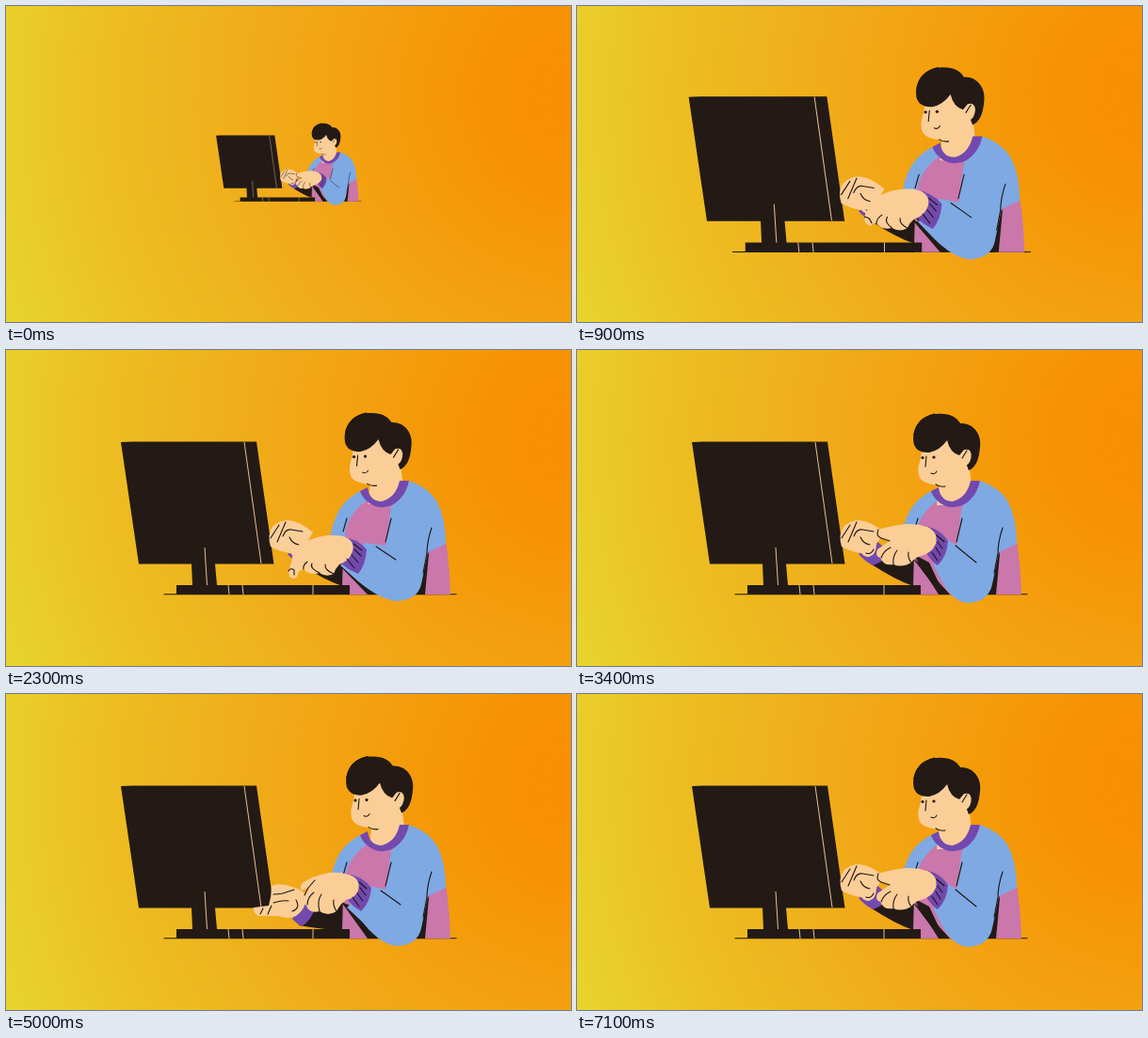
An HTML page that plays this animation: 600x336 px, repeating every 7200 ms.

```html
<!DOCTYPE html>
<html lang="en">
<head>
<meta charset="utf-8">
<title>Typing at a desk</title>
<style>
  html, body { margin: 0; height: 100%; overflow: hidden; background: #f2a617; }
  svg { display: block; width: 100%; height: 100%; }
  .ink { fill: #231a16; }
  .blue { fill: #7ea9e3; }
  .pink { fill: #ca77ab; }
  .purple { fill: #7349ae; }
  .skin { fill: #fbce98; }
  .line, .glint { fill: none; stroke: #1d1512; stroke-width: 1.1; stroke-linecap: round; stroke-linejoin: round; }
  .glint { stroke: #e9bf8d; stroke-width: 1; stroke-linecap: butt; }
</style>
</head>
<body>
<svg viewBox="0 0 600 336">
  <defs>
    <radialGradient id="sky" gradientUnits="userSpaceOnUse" cx="612" cy="95" r="650">
      <stop offset="0" stop-color="#f88e00"/>
      <stop offset=".17" stop-color="#f79303"/>
      <stop offset=".5" stop-color="#f1a917"/>
      <stop offset=".8" stop-color="#ecbf23"/>
      <stop offset="1" stop-color="#e8d32e"/>
    </radialGradient>
  </defs>
  <rect width="600" height="336" fill="url(#sky)"/>
  <g id="scene">
    <path class="line" d="M168 259.700H478"/>

    <g id="torso">
      <path class="blue" d="M345 195Q349 174 360 162Q368 154 378 149L391 164L365 191L357 222L348 222Z"/>
      <path class="pink" d="M361 190Q367 171 382 161L411 164L412 215L420 260H357L357 222Z"/>
      <path class="pink" d="M447 214L467 203Q471 228 472 260H440Z"/>
      <path class="ink" d="M357 222L368 229L396 260H386ZM447 212L449 217L445 260H434Z"/>
      <path class="line" d="M362 179L358 193"/>
    </g>

    <g id="head">
      <path class="skin" d="M366 100C367 116 362 119 362.500 130C363 139 369 142 384 144L382 165H421L417 126L419 105L400 88H372Z"/>
      <path class="ink" d="M358 101C354 84 365 69 382 68C395 67 403 71 407 78C420 77 430 89 428 103C427 117 423 125 416 128L413 120L418 113Q419 105 411 106L406 112Q396 109 393 96Q385 107 374 109Q362 110 358 101Z"/>
      <path class="skin" d="M407 113Q410 104 416 106Q421 110 417 119Q413 126 407 121Z"/>
      <path class="line" d="M358 90Q361 72 380 68M409 115L414 107M371 113L370 124M376 131Q380 133 382 129M381 143Q386 146 391 145"/>
      <circle class="ink" cx="367" cy="114.500" r="1.6"/>
      <circle class="ink" cx="379" cy="114" r="1.6"/>
    </g>

    <path class="purple" d="M376 150L384 146Q386 161 399 161Q414 157 418 139L428 139Q425 157 412 164Q398 171 386 163Q378 157 376 150Z"/>

    <path class="ink" d="M122 98L134 97.500H266L284.500 227.500H222L224 250H365V260H181V250H198L197 227.500H141Z"/>
    <path class="glint" d="M253 98L271 227M211 210L213.500 250M236 250L237 260M251 250L252 260M326 250V260"/>
    <g id="arms"></g>
  </g>
</svg>
<script>
const LOOP = 7200, CYCLE = 3600, STEP = 100;
const $ = id => document.getElementById(id);

// Each limb part: class, then its shape at rest, with the far hand down, with the near hand down.
const parts = [
  ['ink',
    'M313 228L332 215L358 216L357 251Q337 244 313 228Z',
    'M311 246L328 226L358 214L357 251Q340 251 311 246Z'],
  ['purple',
    'M299 217Q312 210 318 203L331 214Q326 226 314 229Q305 224 299 217Z',
    'M304 239Q313 228 313 215L328 228Q324 241 314 247Q308 244 304 239Z'],
  ['skin',
    'M281 209Q277 196 283 188Q290 181 300 181Q312 182 326 194Q322 201 318 206Q318 218 310 220Q305 220 302 216Q289 214 281 209Z',
    'M268 236Q261 231 263 227Q272 226 279 225Q282 215 282 204Q290 200 304 205Q318 209 319 217Q318 229 308 236Q300 240 290 236Q276 237 268 236Z'],
  ['line',
    'M281 200L290 186M288 204L297 183M294 198Q297 190 303 191L315 193M301 199Q304 206 311 207M315 212Q312 218 307 216',
    'M270 234L273 228M278 234L282 225M284 213Q289 213 294 212L306 208M284 222Q294 219 300 220M308 219Q313 228 304 231'],
  ['ink',
    'M357 217L374 226L390 260H384Z',
    'M356 221L368 226L390 260H384Z',
    'M354 229L364 232L390 260H384Z'],
  ['blue',
    'M409 166Q425 156 428 139Q448 146 457 160Q467 178 467 206L448 215L441 249Q437 268 415 269Q398 268 386 243L378 227L393 201L403 208Z',
    'M409 166Q425 156 428 139Q448 146 457 160Q467 178 467 206L448 215L441 249Q437 267 415 268Q398 267 378 242L362 227L387 204L403 208Z',
    'M409 166Q425 156 428 139Q448 146 457 160Q467 178 467 206L448 215L441 249Q437 266 415 267Q398 266 374 246L355 229L381 205L403 208Z'],
  ['purple',
    'M366 187Q384 188 394 203Q393 219 383 229Q376 225 371 215Z',
    'M360 191Q378 193 388 206Q387 221 377 231Q368 226 361 217Z',
    'M354 198Q373 200 383 212Q382 228 374 238Q362 233 355 226Z'],
  ['skin',
    'M372 188Q384 194 381 206Q377 216 365 219Q358 221 355 226Q345 232 336 228Q326 230 322 221Q316 219 319 212L332 203L323 200Q316 196 320 191Q333 187 342 186Q357 183 372 188Z',
    'M364 192Q377 196 374 209Q370 218 361 219Q356 222 351 231Q342 237 333 231Q322 234 319 225Q314 222 317 214L321 206L314 209Q311 204 316 200Q326 194 338 191Q351 188 364 192Z',
    'M358 198Q371 202 368 214Q365 224 354 228Q350 232 348 238Q340 242 333 237Q322 240 316 233Q310 234 309 241L306 243.5L301 241Q299 236 303 226Q303 214 316 205Q336 194 358 198Z'],
  ['line',
    'M320 191Q317 198 323 200L332 203M323 221Q325 214 333 210M336 228Q335 219 340 213M355 226Q351 221 352 215',
    'M317 214Q319 210 321 206L328 198M320 224Q320 216 327 211M333 231Q330 220 335 213M351 231Q347 225 348 219',
    'M300 235Q302 231 306 234L306 239M316 233Q315 229 320 225M333 237Q322 232 325 227M348 238Q338 234 339 228'],
  ['line',
    'M382 197L390 204M383 204L388 211M381 210L386 218M377 215L383 224M402 208L424 226',
    'M375 200L383 207M376 206L382 214M373 212L379 220M368 216L375 226M398 209L419 224',
    'M369 206L378 213M370 212L377 219M367 218L374 226M362 222L370 232M393 209L414 223'],
  ['line', 'M409 179L403 204M452 189Q447 204 447 216L443 237']
];

const limbs = parts.map(([kind, ...poses]) => {
  const el = document.createElementNS('http://www.w3.org/2000/svg', 'path');
  el.setAttribute('class', kind);
  el.setAttribute('d', poses[0]);
  $('arms').append(el);
  return { el, rest: poses[0], values: poses.map(p => p.match(/[\d.]+/g).map(Number)) };
});

const smooth = x => (x = Math.min(1, Math.max(0, x)), x * x * (3 - 2 * x));
const pulse = (t, from, to, ramp = 150) => smooth((t - from) / ramp) * smooth((to - t) / ramp);

function popScale(t) {
  const phase = 1.03 + 0.00992 * t, damping = 0.4045;
  return 1 - Math.exp(-damping * phase) * (Math.cos(phase) + damping * Math.sin(phase));
}

function draw(t) {
  const c = t % CYCLE;
  const far = pulse(c, 1050, 1720) + pulse(c, 2480, 2850);
  const near = pulse(c, 550, 1000) + pulse(c, 2050, 2500) + pulse(c, 2850, 3250);

  $('scene').setAttribute('transform', `translate(300 168) scale(${popScale(t)}) translate(-300 -168)`);
  const sway = 4 * far + 2.5 * near + pulse(c, 150, 650);
  $('head').setAttribute('transform', `translate(${sway} ${-0.35 * sway})`);

  for (const { el, rest, values: [a, b = a, d = a] } of limbs) {
    let i = 0;
    el.setAttribute('d', rest.replace(/[\d.]+/g, () => {
      const v = a[i] + (b[i] - a[i]) * far + (d[i] - a[i]) * near;
      i++;
      return v.toFixed(2);
    }));
  }
}

const start = performance.now();
function tick() {
  const t = (performance.now() - start) % LOOP;
  draw(Math.floor(t / STEP) * STEP);
  requestAnimationFrame(tick);
}
tick();
</script>
</body>
</html>
```
